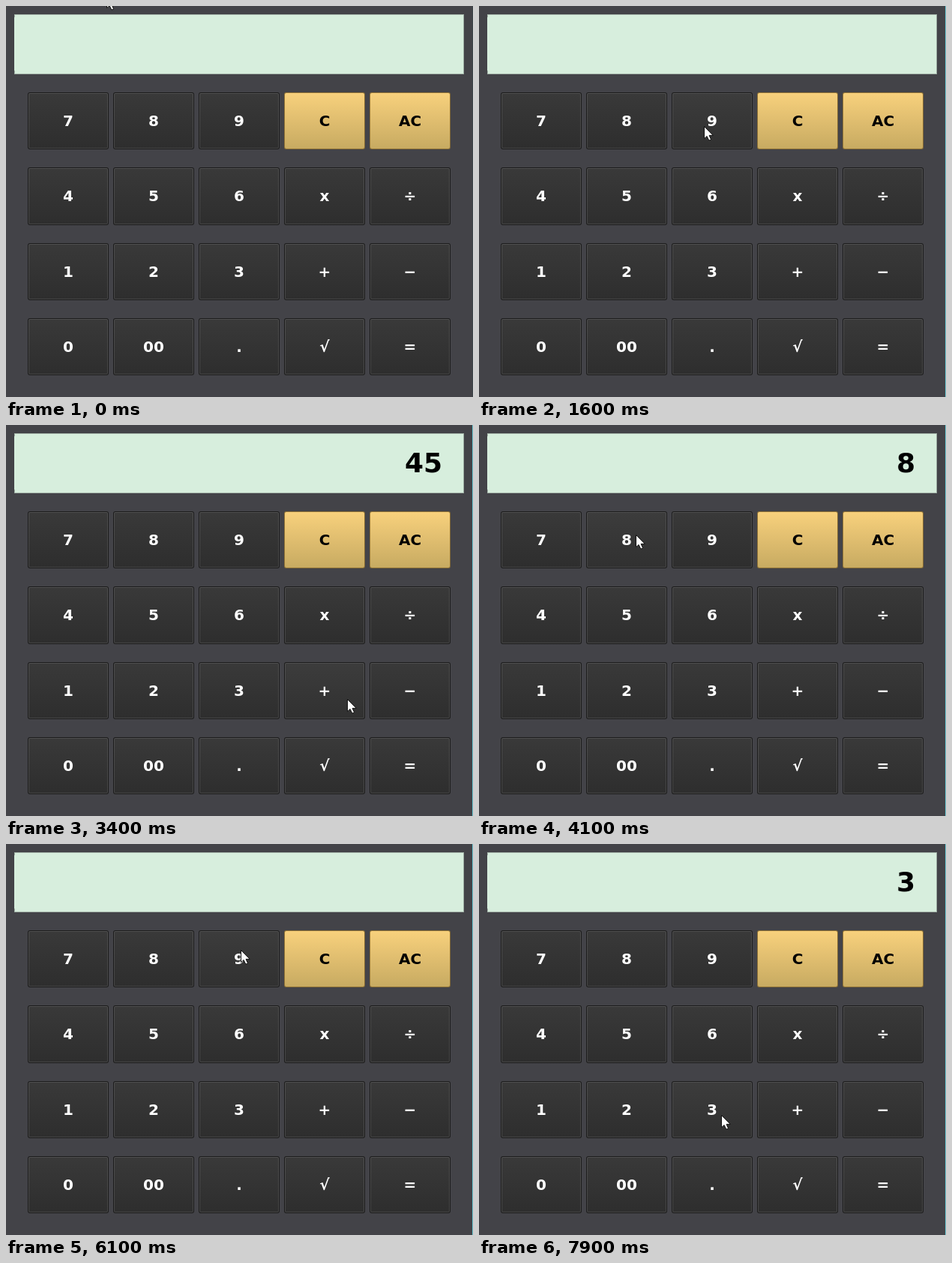
Recreate the animation shown at these times as an HTML page. Size 623 px wide and 521 px high, loop 8 s.

```html
<!DOCTYPE html>
<html lang="en">
<head>
<meta charset="utf-8">
<title>Calculator</title>
<style>
  html, body { margin: 0; width: 100%; height: 100%; overflow: hidden; background: #434348; }
  svg { display: block; width: 623px; height: 521px; }
  text { font-family: "DejaVu Sans", sans-serif; font-weight: bold; font-size: 20px; text-anchor: middle; fill: #fff; }
  #readout { font-size: 36px; text-anchor: end; fill: #000; }
  .rim { fill: #1b1b1b; }
  .edge { fill: url(#edge); }
  .face { fill: url(#dark); }
  .hover .face { fill: url(#lit); }
  .pressed .edge, .pressed .face { fill: #2b2b2b; }
  .gold .rim { fill: #8b6f35; }
  .gold .edge, .gold .face { fill: url(#gold); }
  .gold text { fill: #000; }
</style>
</head>
<body>
<svg viewBox="0 0 623 521">
  <defs>
    <linearGradient id="dark" x2="0" y2="1"><stop stop-color="#393939"/><stop offset="1" stop-color="#2e2e2e"/></linearGradient>
    <linearGradient id="lit" x2="0" y2="1"><stop stop-color="#3c3c3c"/><stop offset="1" stop-color="#313131"/></linearGradient>
    <linearGradient id="edge" x2="0" y2="1"><stop stop-color="#505050"/><stop offset="1" stop-color="#464646"/></linearGradient>
    <linearGradient id="gold" x2="0" y2="1"><stop stop-color="#f7d07c"/><stop offset="1" stop-color="#c8ab62"/></linearGradient>
  </defs>
  <rect width="623" height="521" fill="#434348"/>
  <rect id="border" x="622" width="1" height="521"/>
  <rect x="11.5" y="11.5" width="599" height="79" fill="#d7eedd" stroke="#a3b3a8"/>
  <path d="M11.5 15V86" stroke="#d7eedd"/>
  <text id="readout" x="582" y="63"></text>
  <g id="keys"></g>
  <path id="cursor" d="M-.5 -.5V15.7L3.1 12.5L5.8 18.2L8.6 17L6.1 11.4H11.2Z" fill="#fff" stroke="#111" stroke-linejoin="round"/>
</svg>
<script>
const LOOP = 8000, TICK = 100, HOLD = 200;
const $ = id => document.getElementById(id);

// Pointer moves; those with a release time click the key they end on
const moves = [
  { go: 100, end: 700, x: 209, y: 266, release: 800 },
  { go: 900, end: 1300, x: 439, y: 244, release: 1500 },
  { go: 1400, end: 1600, x: 301, y: 161 },
  { go: 1600, end: 1800, x: 302, y: 138, release: 1900 },
  { go: 2000, end: 2500, x: 544, y: 444 },
  { go: 2600, end: 2700, x: 542, y: 444, release: 2800 },
  { go: 3200, end: 3700, x: 206, y: 141, release: 3900 },
  { go: 4000, end: 4600, x: 423, y: 449, release: 4900 },
  { go: 4800, end: 5200, x: 430, y: 341, release: 5800 },
  { go: 5700, end: 6200, x: 310, y: 135, release: 6300 },
  { go: 6400, end: 6900, x: 544, y: 493 },
  { go: 6900, end: 7100, x: 543, y: 467, release: 7300 },
  { go: 7200, end: 7800, x: 324, y: 362, release: 7900 },
];

function add(parent, tag, attrs) {
  const el = document.createElementNS('http://www.w3.org/2000/svg', tag);
  for (const name in attrs) el.setAttribute(name, attrs[name]);
  return parent.appendChild(el);
}

const labels = '7 8 9 C AC 4 5 6 x ÷ 1 2 3 + − 0 00 . √ ='.split(' ');
const keys = labels.map((label, i) => {
  const x = 29 + (i % 5) * 114, top = 115 + Math.floor(i / 5) * 301 / 3;
  const y = Math.round(top), w = 108, h = Math.round(top + 76.3) - y;
  const el = add($('keys'), 'g', { class: /C/.test(label) ? 'gold' : 'key' });
  ['rim', 'edge', 'face'].forEach((part, n) => add(el, 'rect', {
    class: part, x: x + n, y: y + n, width: w - 2 * n, height: h - 2 * n, rx: 3 - n,
  }));
  add(el, 'text', { x: x + w / 2, y: y + 45 }).textContent = label;
  return { label, el, x, y, w, h };
});

const keyAt = p => keys.find(k => p.x >= k.x && p.x < k.x + k.w && p.y >= k.y && p.y < k.y + k.h);
const ease = k => k < .5 ? 4 * k ** 3 : 1 - 4 * (1 - k) ** 3;

function pointerAt(t) {
  const pos = { x: 135, y: -13 };
  for (const m of moves) {
    const k = ease(Math.min(1, Math.max(0, (t - m.go) / (m.end - m.go))));
    pos.x += (m.x - pos.x) * k;
    pos.y += (m.y - pos.y) * k;
  }
  return { x: Math.round(pos.x), y: Math.round(pos.y) };
}

const operations = { x: (a, b) => a * b, '+': (a, b) => a + b };

// Replays every click up to time t
function readoutAt(t) {
  let shown = '', stored, operation, fresh = true;
  for (const m of moves.filter(m => m.release <= t)) {
    const { label } = keyAt(m);
    if (/\d/.test(label)) {
      shown = fresh ? label : shown + label;
      fresh = false;
      continue;
    }
    fresh = true;
    if (label === '=') shown = operation(stored, +shown);
    else if (label === '√') shown = Math.sqrt(shown);
    else {
      stored = +shown;
      operation = operations[label];
      shown = '';
    }
  }
  return shown;
}

function draw(t) {
  const pos = pointerAt(t), over = keyAt(pos);
  const down = moves.some(m => t >= Math.max(m.end, m.release - HOLD) && t < m.release);
  $('cursor').setAttribute('transform', `translate(${pos.x} ${pos.y})`);
  $('readout').textContent = readoutAt(t);
  $('border').setAttribute('fill', t < 200 ? '#3b4348' : '#6bc5cf');
  for (const key of keys) {
    key.el.classList.toggle('hover', key === over && key.el.classList.contains('key'));
    key.el.classList.toggle('pressed', key === over && down);
  }
}

const start = performance.now();
function frame() {
  const t = (performance.now() - start) % LOOP;
  draw(Math.floor(t / TICK) * TICK);
  requestAnimationFrame(frame);
}
frame();
</script>
</body>
</html>
```
